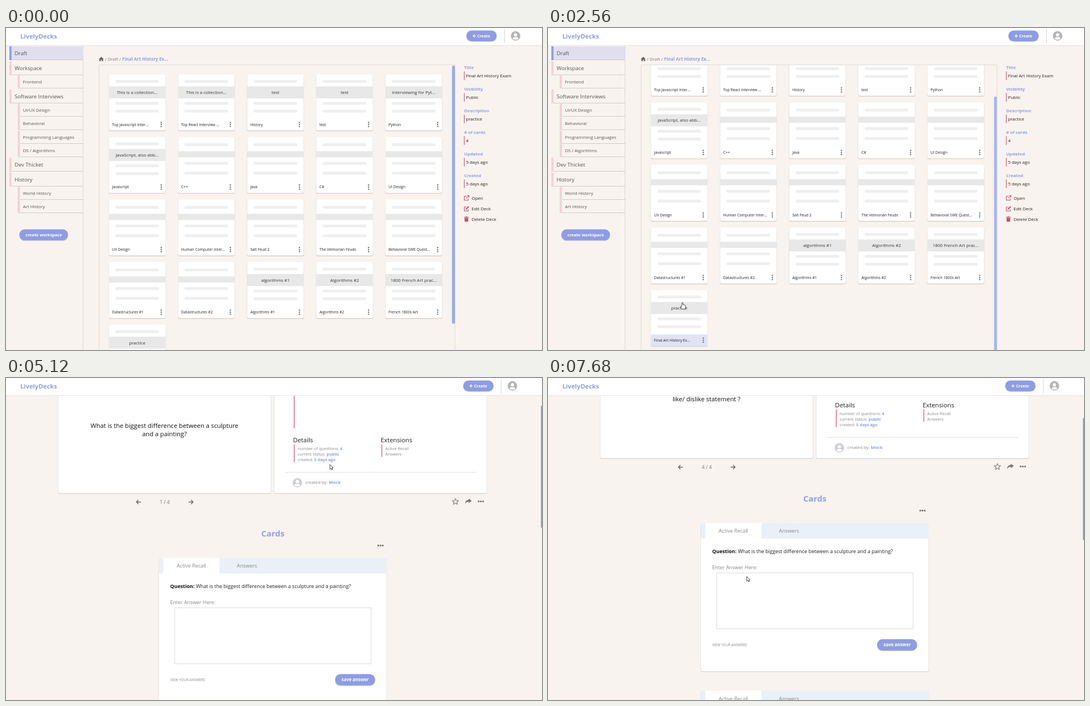
Recreate the animation shown at these times as an HTML page. Size 964 px wide and 581 px high, loop 8000 ms.

```html
<!DOCTYPE html>
<html lang="en">
<head>
<meta charset="utf-8">
<title>Flash card decks</title>
<style>
  html, body { margin: 0; width: 100%; height: 100%; overflow: hidden; background: #f8f3ee; }
  svg { display: block; width: 100%; height: 100%; font-family: "Open Sans", sans-serif; }
</style>
</head>
<body>
<svg id="stage" viewBox="0 0 964 581"></svg>
<script>
const LOOP = 8000;
const BLUE = '#8f9fee', BUTTON = '#8e9de3', RED = '#c8506e', GRAY = '#777';
const BOLD = 'font-weight="700"', MID = 'text-anchor="middle"';

// ---- drawing helpers (text y is the middle of the capitals) ----
const text = (x, y, size, str, fill = '#555', attrs = '') =>
  `<text x="${x}" y="${y + size * 0.357}" font-size="${size}" fill="${fill}" ${attrs}>${str}</text>`;
const bold = (str, fill) => `<tspan ${BOLD} fill="${fill}">${str}</tspan>`;
const rect = (x, y, w, h, fill, r = 0, attrs = '') =>
  `<rect x="${x}" y="${y}" width="${w}" height="${h}" rx="${r}" fill="${fill}" ${attrs}/>`;
const icon = (x, y, d, fill, attrs = '') =>
  `<path transform="translate(${x} ${y})" d="${d}" fill="${fill}" ${attrs}/>`;
const lineIcon = (x, y, d, color, width = 1.1) =>
  icon(x, y, d, 'none', `stroke="${color}" stroke-width="${width}"`);
const paper = (x, y, w, h, r = 3) =>
  rect(x - 0.4, y + 0.6, w + 0.8, h + 0.8, '#d6d1cf', r) + rect(x, y, w, h, '#fff', r);
const button = (x, y, w, h, size, label) =>
  rect(x, y + 1, w, h, '#d3d2e2', 9.5) + rect(x, y, w, h, BUTTON, 9.5) +
  text(x + w / 2, y + h / 2, size, label, '#fff', `${BOLD} ${MID}`);
const dots = (x, y, dx, dy, r) =>
  [-1, 0, 1].map(i => `<circle cx="${x + i * dx}" cy="${y + i * dy}" r="${r}" fill="${GRAY}"/>`).join('');
const avatar = (x, y, color) =>
  `<circle cx="${x}" cy="${y}" r="8.5" fill="${color}"/><circle cx="${x}" cy="${y - 2}" r="2.9" fill="#fff"/>` +
  icon(x, y, 'M-5.2 5.2C-5 1 5 1 5.2 5.2Q0 8.6-5.2 5.2Z', '#fff');

// ---- header ----
const header = () =>
  rect(0, 0, 964, 31.5, '#fff') + rect(0, 31.3, 964, 0.9, '#e2dddd') +
  text(25.7, 15, 11.3, 'LivelyDecks', BLUE, BOLD) +
  `<g id="tools">${rect(828, 5.5, 54.5, 19.5, '#d3d2e2', 9.5)}${rect(828, 4.5, 54.5, 19.5, BUTTON, 9.5)}
  ${lineIcon(842, 14.4, 'M-2.9 0H2.9M0-2.9V2.9', '#fff', 1.3)}${text(847.5, 14.4, 7.1, 'Create', '#fff', BOLD)}
  ${rect(896, 2, 0.9, 25.5, '#cfcdda')}${avatar(916.5, 14.2, '#b5b5b7')}</g>`;

// ---- library view ----
// [label, bottom edge, level]
const menu = [
  ['Draft', 58, 0], ['Workspace', 85, 0], ['Frontend', 109, 1], ['Software Interviews', 136, 0],
  ['UI/UX Design', 160, 1], ['Behavioral', 184, 1], ['Programming Languages', 209, 1],
  ['DS / Algorithms', 233, 1], ['Dev Thicket', 259, 0], ['History', 286, 0],
  ['World History', 310, 1], ['Art History', 334, 1]
];
const menuItem = ([label, bottom, sub], i) => {
  const x = sub ? 21 : 6, h = sub ? 23.5 : 25;
  return (i ? '' : rect(6, 33.5, 132.5, 24.5, '#e0def0')) +
    rect(x, bottom - h, 4, h, i ? '#f0d3d8' : BLUE) +
    rect(x + 4, bottom - 0.9, 134.5 - x, 0.9, '#ccc8c8') +
    text(sub ? 30.5 : 15.5, bottom - 12.2, sub ? 7.95 : 9.6, label);
};
const sidebar = () => rect(138.2, 32, 0.9, 549, '#d9d5d4') + menu.map(menuItem).join('') +
  button(24, 363.3, 87.5, 20, 7.45, 'create workspace');

// [name, description]
const decks = [
  ['Top Javascript Inter...', 'This is a collection...'], ['Top React Interview ...', 'This is a collection...'],
  ['History', 'test'], ['test', 'test'], ['Python', 'Interviewing for Pyt...'],
  ['Javascript', 'JavaScript, also abb...'], ['C++'], ['Java'], ['C#'], ['UI Design'],
  ['UX Design'], ['Human Computer Inter...'], ['Salt Feud 2'], ['The Velmorian Feuds'], ['Behavioral SWE Quest...'],
  ['Datastructures #1'], ['Datastructures #2'], ['Algorithms #1', 'algorithms #1'],
  ['Algorithms #2', 'Algorithms #2'], ['French 1800s Art', '1800 French Art prac...'],
  ['Final Art History Ex...', 'practice']
];
const deckCard = ([name, about], i) => {
  const x = 185.2 + (i % 5) * 124.3, y = 83.8 + Math.floor(i / 5) * 112.9;
  const selected = i === decks.length - 1;
  const bars = about ? [12.5, 52, 66.2] : [14, 47.5, 65.2];
  return paper(x, y, 101.6, 101) +
    bars.map(b => rect(x + 11.5, y + b - 2.6, 78.5, 5.2, '#efefef', 2.6)).join('') +
    rect(x, y + (about ? 21.6 : 25.7), 101.6, about ? 21.6 : 11, '#e8e8e8') +
    (selected ? rect(x, y + 80, 101.6, 21, '#e1e3f5', 2) +
      rect(x + 35.5, y + 25, 30, 13.5, '#c0d3ea', 0, 'id="wordMark"') : '') +
    (about ? text(x + 50.8, y + 32.4, 7.95, about, '#333', MID) : '') +
    text(x + 5.6, y + 90.3, 6.75, name, '#222') + dots(x + 94, y + 90.3, 0, 3.7, 1.25);
};
const details = [['Title', 'Final Art History Exam'], ['Visibility', 'Public'], ['Description', 'practice'],
  ['# of cards', '4'], ['Updated', '5 days ago'], ['Created', '5 days ago']];
const detail = ([label, value], i) => {
  const y = 71 + i * 39;
  return text(824, y, 7.85, label, BLUE, BOLD) + rect(823.7, y + 7.3, 1.1, 15.5, RED) +
    text(827.4, y + 15, 7.95, value, '#222');
};
const BOX = 'M0-3H-4V4.2H3V1';
const library = () => sidebar() +
  icon(171.3, 56, 'M-4.6 .3L0-4 4.6 .3H3.3V4H1V1.2H-1V4H-3.3V.3Z', '#666') +
  text(178, 56, 7.95, `/ Draft / ${bold('Final Art History Ex...', BLUE)}`, GRAY) +
  `<path d="M167.5 581V66.5H807.5V581" fill="none" stroke="#ddd8d8" stroke-width=".9"/>
  <g clip-path="url(#listClip)"><g id="deckList">${decks.map(deckCard).join('')}</g>
  ${rect(802.2, 68, 5.2, 465.5, '#a9b8e8', 2, 'id="listThumb"')}</g>` +
  details.map(detail).join('') +
  lineIcon(828.3, 306.5, BOX + 'M-.5 .8L4.2-3.9M1-4.2H4.4V-.8', RED) +
  lineIcon(828.3, 326, BOX, RED) + lineIcon(828.3, 326, 'M-1.5 1.5L4-4', RED, 2) +
  icon(828, 345, 'M-4.2-4.3H-1.5V-5H1.5V-4.3H4.2V-3.2H-4.2ZM-3.5-2.5H3.5L3 4.5H-3Z', RED) +
  ['Open', 'Edit Deck', 'Delete Deck'].map((s, i) => text(837.5, 306.8 + i * 19.2, 7.95, s, '#222')).join('');

// ---- deck view ----
const questions = [
  ['What is the biggest difference between a sculpture', 'and a painting?'],
  ['what is the difference between fine art and', 'decorative craft ?'],
  ['how does the place where a work of art is', 'shown change the way that people look at it', 'and talk about it ?'],
  ['what is the difference between a judgment and a', 'like/ dislike statement ?']
];
const questionText = lines => lines.map((line, i) =>
  text(285, 235.9 + (i - (lines.length - 1) / 2) * 15.5, 11.3, line, '#111', MID)).join('');
const categories = [['One', 94, 54], ['Two', 168.5, 54], ['Three', 242.5, 60.5], ['Four', 323, 56.5], ['Five', 399, 53.5]];
const category = ([name, x, w]) =>
  text(x, 100.8, 8.5, `Category ${name}`, '#aaa5a3') + rect(x, 105.8, w, 0.8, '#ecd5d6');
const ARROW = 'M-4 0H4M.3-3.7L4 0 .3 3.7';

const answerBox = (y) =>
  paper(275, y, 409.5, 267.5) + rect(275, y, 409.5, 28, '#eaf0f8', 2) + rect(283, y, 101, 29, '#fff') +
  text(333.4, y + 14.5, 9.2, 'Active Recall', '#888', MID) + text(433.5, y + 14.5, 9.2, 'Answers', '#888', MID) +
  text(295.3, y + 51.2, 9.04, `${bold('Question:', '#111')} ${questions[0].join(' ')}`, '#222') +
  text(295.3, y + 80.5, 9.04, 'Enter Answer Here:', '#888') +
  rect(303.4, y + 90, 353.2, 101, '#fff', 0, 'stroke="#d6d6dc" stroke-width=".9"') +
  text(295.3, y + 219.8, 6.2, 'VIEW YOUR ANSWERS', '#888') + button(592, y + 209.5, 71.7, 20.5, 7.9, 'save answer');

const deckPage = () =>
  text(94, 76.2, 14.6, 'Final Art History Exam', '#111') + categories.map(category).join('') +
  paper(94.2, 121, 382, 229) + paper(482.6, 121, 382, 229) + '<g id="question"></g>' +
  text(516.3, 145.3, 11.3, 'Description', '#222') + rect(517.8, 152.5, 1.2, 80.5, RED) +
  text(524.5, 160.5, 7.4, 'practice', '#888') +
  text(516.3, 254.7, 11.3, 'Details', '#222') + rect(517.8, 262, 1.2, 32, RED) +
  [['number of questions', 4], ['current status', 'public'], ['created', '5 days ago']].map(([k, v], i) =>
    text(524.5, 270 + i * 9.8, 7.4, `${k}: ${bold(v, BLUE)}`, '#888')).join('') +
  text(673.7, 254.7, 11.3, 'Extensions', '#222') + rect(675.3, 262, 1.2, 22.5, RED) +
  text(682, 270, 7.4, 'Active Recall', '#888') + text(682, 279.8, 7.4, 'Answers', '#888') +
  rect(502, 312, 344, 0.9, '#d9d9dc') + avatar(524, 331.2, '#cfd0d6') +
  text(538.3, 331, 7.85, `created by: ${bold('Mock', BLUE)}`, '#888') +
  rect(317.4, 356.2, 30.4, 20.4, '#c5d6ea', 0, 'id="arrowMark"') +
  `<g transform="translate(477 0) scale(-1 1)">${lineIcon(238.5, 366, ARROW, '#666', 1.4)}</g>
  <g id="next" stroke="#666">${icon(332.5, 366, ARROW, 'none', 'stroke-width="1.4"')}</g>
  <g id="counter"></g>` +
  lineIcon(808.3, 365.2, 'M0-5.4L1.6-1.8 5.5-1.5 2.6 1.2 3.4 5 0 3-3.4 5-2.6 1.2-5.5-1.5-1.6-1.8Z', GRAY) +
  icon(831.5, 365, 'M-5.5 4.5C-6-1-2-3 1-3V-5.2L6-1 1 3V.6C-2 .5-4 1-5.5 4.5Z', GRAY) +
  dots(854, 365, 4, 0, 1.6) + text(480, 423.3, 14.9, 'Cards', BLUE, `${BOLD} ${MID}`) +
  dots(673.5, 444.5, 4, 0, 1.6) + answerBox(467) + answerBox(769.3);

const OUTLINE = 'stroke="#222" stroke-width=".8" stroke-linejoin="round"';
document.getElementById('stage').innerHTML =
  `<clipPath id="listClip"><rect x="167" y="67" width="641" height="514"/></clipPath>
  ${rect(0, 0, 964, 581, '#f8f3ee')}
  <g id="library">${library()}</g><g id="deckPage">${deckPage()}</g>${header()}
  ${rect(962, 0, 2, 220, BLUE, 0, 'id="pageThumb"')}
  <g id="hand">${icon(0, 0, 'M-2.2 1V-5.2Q-1.2-7-.2-5.2V-1.8L3.8-.8Q5-.4 4.8 1.2L3.6 6.2H-1.6L-4.8 1.8Q-4.6 .2-2.2 1.6', '#fff', OUTLINE)}</g>
  <g id="pointer">${icon(-2.5, -5, 'M0 0V8.6L2.1 6.8 3.5 9.9 4.9 9.2 3.5 6.2H6Z', '#fff', OUTLINE)}</g>`;

// ---- motion ----
const el = Object.fromEntries([...document.querySelectorAll('[id]')].map(e => [e.id, e]));

// Eased interpolation through [time, ...values] keys.
function track(keys, t) {
  const i = keys.findIndex(k => k[0] > t);
  if (i === 0) return keys[0].slice(1);
  if (i < 0) return keys[keys.length - 1].slice(1);
  const [a, b] = [keys[i - 1], keys[i]], u = (t - a[0]) / (b[0] - a[0]), s = u * u * (3 - 2 * u);
  return a.slice(1).map((v, k) => v + (b[k + 1] - v) * s);
}
const cursorPath = [
  [70, 838, 300], [650, 400, 262], [820, 377, 258], [1000, 377, 258], [1690, 338, 302], [2350, 246, 510],
  [2560, 243, 501], [2770, 242, 497], [3500, 242, 497], [4260, 617, 177], [4490, 617, 177], [4660, 613, 174],
  [4970, 587, 162], [5120, 585, 161], [5850, 337, 374], [6740, 337, 374], [6970, 338, 377], [7290, 338, 377], [7680, 360, 363]
];
const listScroll = [[640, 0], [820, 28.3], [950, 28.3], [1500, 62.5]];
const pageScroll = [[4740, 0], [5000, 142.3], [5180, 142.3], [5650, 0], [7260, 0], [7680, 205.3]];
const clicks = [5960, 6430, 6740];

const show = (node, on) => node.setAttribute('display', on ? 'inline' : 'none');
const move = (node, x, y) => node.setAttribute('transform', `translate(${x} ${y})`);
const between = (t, a, b) => t >= a && t < b;

function render(t) {
  const onLibrary = t < 2940, onDeck = t >= 3500;
  show(el.library, onLibrary);
  show(el.deckPage, onDeck);
  show(el.pageThumb, onDeck);
  show(el.tools, onLibrary || onDeck);
  move(el.tools, onDeck ? -5.7 : 0, 0);

  const [list] = track(listScroll, t), [page] = track(pageScroll, t);
  move(el.deckList, 0, -list);
  move(el.listThumb, 0, list * 0.89);
  el.listThumb.setAttribute('fill', t < 300 ? '#9aaae5' : '#a9b8e8');
  show(el.wordMark, t >= 2700);
  move(el.deckPage, 0, -page);
  move(el.pageThumb, 0, page * 0.352);

  const index = clicks.filter(c => t >= c).length;
  if (el.question.dataset.index !== String(index)) {
    el.question.dataset.index = index;
    el.question.innerHTML = questionText(questions[index]);
    el.counter.innerHTML = text(285.5, 366, 8.8, `${index + 1} / 4`, GRAY, MID);
  }
  const onNext = between(t, 5850, 7290);
  el.next.setAttribute('stroke', onNext ? RED : '#666');
  show(el.arrowMark, between(t, 6430, 7290));

  const [x, y] = track(cursorPath, t);
  const isHand = (onLibrary && x < 790) || onNext;
  move(el.hand, x, y);
  move(el.pointer, x, y);
  show(el.hand, t >= 70 && isHand);
  show(el.pointer, t >= 70 && !isHand);
}

function frame() {
  render(performance.now() % LOOP);
  requestAnimationFrame(frame);
}
frame();
</script>
</body>
</html>
```
